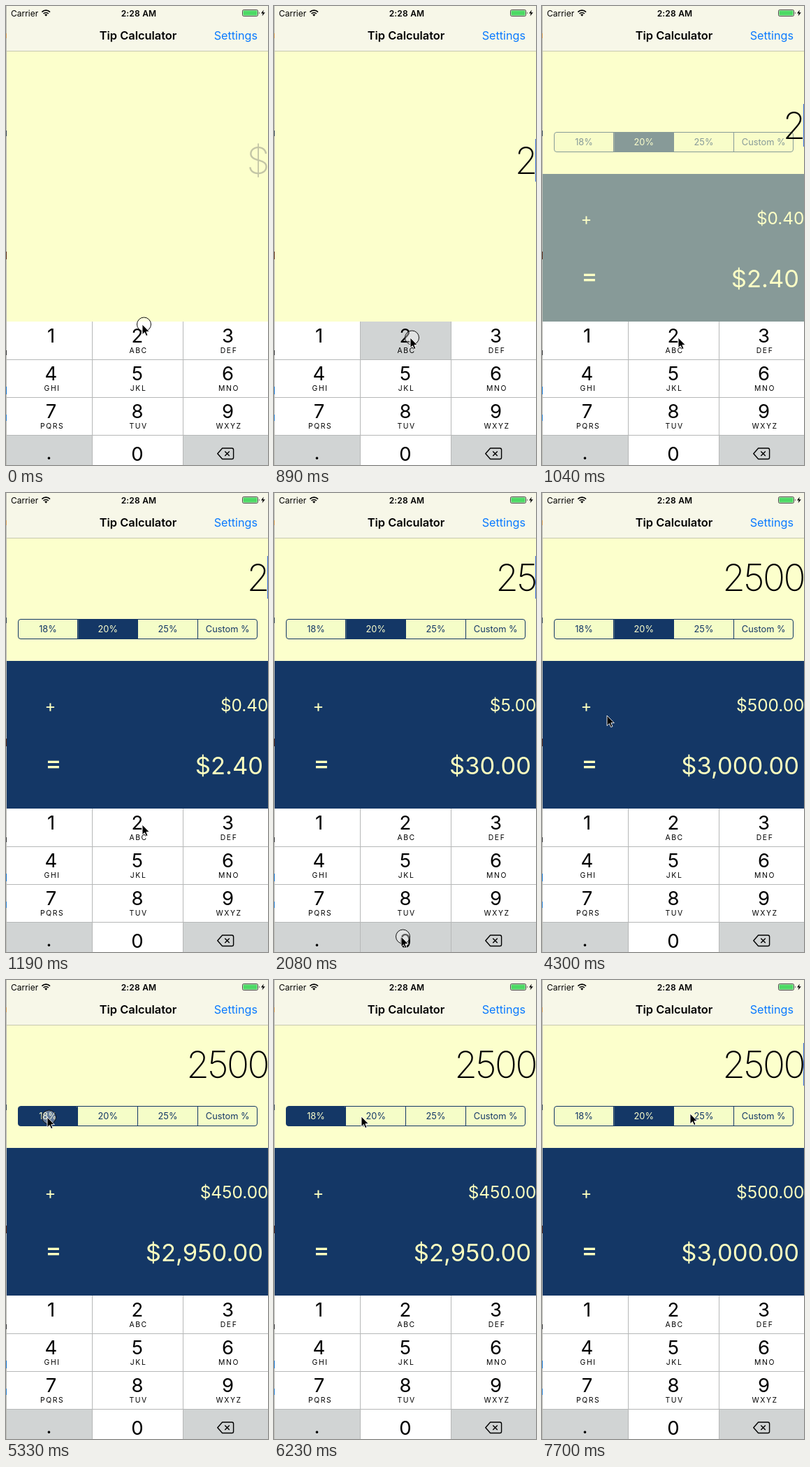
Write an HTML page that moves like this. It is 375 by 656 pixels and loops after 8 s.

```html
<!DOCTYPE html>
<html lang="en">
<head>
<meta charset="utf-8">
<title>Tip Calculator</title>
<style>
  html, body { margin: 0; width: 100%; height: 100%; overflow: hidden; background: #fff; }
  svg { display: block; width: 375px; height: 656px; font-family: Inter, Roboto, sans-serif; font-optical-sizing: none; }
  .mid { text-anchor: middle; }
  .end { text-anchor: end; }
  .key { font-size: 27.5px; }
  .sub { font-size: 10.4px; letter-spacing: 1.6px; }
  .bill { font-size: 53px; font-weight: 200; letter-spacing: -2.5px; }
  .seg { font-size: 12.8px; }
</style>
</head>
<body>
<svg id="stage" viewBox="0 0 375 656">
  <rect width="375" height="656" fill="#fcffcc"/>

  <rect width="375" height="64" fill="#f7f7e8"/>
  <rect y="64" width="375" height="1" fill="#c8c9b0"/>
  <text x="7" y="14.5" font-size="12">Carrier</text>
  <g fill="none" stroke="#000" stroke-width="1.7">
    <path d="M51.4 8.6A8.2 8.2 0 0 1 63 8.6"/>
    <path d="M53.6 11A5.1 5.1 0 0 1 60.8 11"/>
  </g>
  <path d="M55.2 12.5A2.9 2.9 0 0 1 59.2 12.5L57.2 14.7Z"/>
  <text class="mid" x="190" y="14.5" font-size="12" font-weight="600" letter-spacing=".2">2:28 AM</text>
  <rect x="338.5" y="5.5" width="22" height="9" rx="1.8" fill="none" stroke="#222" stroke-width=".8"/>
  <rect x="339.5" y="6.5" width="20" height="7" rx=".8" fill="#4cd964"/>
  <path d="M362 8.2Q363.4 10 362 11.8Z"/>
  <path d="M368.8 5.5L365 10.6H367.6L366.6 14.5L370.8 9.2H368Z"/>
  <text class="mid" x="189" y="48" font-size="16.4" font-weight="600">Tip Calculator</text>
  <text class="end" x="360" y="48" font-size="16.2" fill="#0a7aff">Settings</text>

  <g id="panel">
    <rect y="240" width="375" height="211" fill="#143766"/>
    <g fill="#fcffbf">
      <text class="mid" x="63.5" y="312.5" font-size="24">+</text>
      <text class="mid" x="68" y="398" font-size="35" font-weight="500">=</text>
      <text id="tip" class="end" x="375.5" y="312" font-size="24.4"></text>
      <text id="total" class="end" x="368" y="402" font-size="34.5"></text>
    </g>
    <g id="segs"></g>
  </g>

  <g id="field">
    <text id="bill" class="bill end" x="375" y="140"></text>
    <rect id="caret" x="374" y="90" width="1" height="61" fill="#3a6bdc"/>
  </g>

  <g id="pad"></g>

  <rect width="1" height="656" fill="#bcbcb6"/>
  <g id="edge"></g>

  <g id="pointer">
    <circle id="ring" cx="2.5" cy="0" r="10" fill="#fff" fill-opacity=".35" stroke="#111"/>
    <path d="M0 0V14.6L3.4 11.5L5.6 16.6L8 15.6L5.8 10.6H10.3Z" stroke="#fff" stroke-width=".9"/>
  </g>
</svg>

<script>
const $ = id => document.getElementById(id);
const LOOP = 8000, STEPS = 54, TICK = LOOP / STEPS;

function add(parent, tag, attrs, text) {
  const el = document.createElementNS('http://www.w3.org/2000/svg', tag);
  for (const name in attrs) el.setAttribute(name, attrs[name]);
  if (text !== undefined) el.textContent = text;
  parent.appendChild(el);
  return el;
}

// Keypad
const GREY = '#d1d4d4';
const labels = ['1', '2', '3', '4', '5', '6', '7', '8', '9', '.', '0', ''];
const letters = ['', 'ABC', 'DEF', 'GHI', 'JKL', 'MNO', 'PQRS', 'TUV', 'WXYZ'];
const cols = [0, 123, 253, 375], centers = [64.5, 188, 317.5];
const keys = {};
labels.forEach((label, i) => {
  const c = i % 3, row = Math.floor(i / 3), y = 451 + row * 54;
  const special = i === 9 || i === 11;
  const box = add($('pad'), 'rect', {
    x: cols[c], y, width: cols[c + 1] - cols[c], height: 55, fill: special ? GREY : '#fff'
  });
  if (!special) keys[label] = box;
  const dot = label === '.';
  add($('pad'), 'text', {
    class: 'key mid', x: dot ? 61.5 : centers[c], y: dot ? 648 : row === 3 ? 650 : y + 30
  }, label);
  if (letters[i]) add($('pad'), 'text', { class: 'sub mid', x: centers[c] + 1.6, y: y + 45 }, letters[i]);
});
for (const y of [505, 559, 613]) add($('pad'), 'rect', { y, width: 375, height: 1, fill: '#b6b8b8' });
for (const x of [123, 253]) add($('pad'), 'rect', { x, y: 451, width: 1, height: 205, fill: '#b6b8b8' });
add($('pad'), 'path', {
  d: 'M309.6 632H323.4Q325.6 632 325.6 634.2V645.3Q325.6 647.5 323.4 647.5H309.6L302.8 639.8ZM313.3 636.5L319.8 643M319.8 636.5L313.3 643',
  fill: 'none', stroke: '#000', 'stroke-width': 1.4, 'stroke-linejoin': 'round'
});

// Tip rate control
const NAVY = '#143766', PALE = '#f5fdc8';
add($('segs'), 'rect', { x: 17.5, y: 180.5, width: 342, height: 28, rx: 3.5, fill: PALE });
const segs = ['18%', '20%', '25%', 'Custom %'].map((label, i) => {
  const x = 17 + i * 85.75;
  const box = add($('segs'), 'rect', { x: x + .5, y: 181, width: 85.5, height: 27.5, rx: i ? 0 : 3 });
  if (i) add($('segs'), 'rect', { x: Math.round(x - .5), y: 181, width: 1, height: 27, fill: NAVY });
  const text = add($('segs'), 'text', { class: 'seg mid', x: x + 43, y: 199.3 }, label);
  return { box, text };
});
segs[3].box.setAttribute('width', 84);
segs[3].box.setAttribute('rx', 3);
add($('segs'), 'rect', { x: 17.5, y: 180.5, width: 342, height: 28, rx: 3.5, fill: 'none', stroke: NAVY });

// Slivers of the window behind
[[39, 7, '#d9a05a'], [178, 8, '#30405a'], [351, 11, '#5a2a18'], [492, 7, '#333'], [544, 11, '#1576d0'], [584, 9, '#2a86d8']]
  .forEach(([y, height, fill]) => add($('edge'), 'rect', { y, width: 1, height, fill }));

// Timeline, in ticks
const path = [
  [0, 195, 455], [2, 195, 474], [8, 195, 474], [10, 190, 523], [12, 190, 523], [14, 182, 634], [26, 182, 634],
  [29, 93, 318], [31, 93, 318], [34, 59, 196], [40, 59, 196], [42, 125, 195], [48, 125, 195], [51, 212, 191]
];
const blinks = [2, 5, 6, 17, 20, 27, 31, 35, 39, 42, 45, 48, 52];
const taps = [[0, 1], [5, 7, '2'], [11, 13, '5'], [14, 16, '0'], [22, 24, '0'], [35, 37], [45, 46]];
const typed = [6, 12, 15, 23];

const clamp = v => Math.max(0, Math.min(1, v));
const money = v => '$' + v.toLocaleString('en-US', { minimumFractionDigits: 2, maximumFractionDigits: 2 });

function position(k) {
  const next = path.findIndex(p => p[0] > k);
  if (next < 0) return path[path.length - 1].slice(1);
  const a = path[next - 1], b = path[next], u = (k - a[0]) / (b[0] - a[0]);
  return [a[1] + (b[1] - a[1]) * u, a[2] + (b[2] - a[2]) * u];
}

function draw(ms) {
  const k = Math.floor((ms % LOOP + 9) / TICK) % STEPS;
  const bill = '2500'.slice(0, typed.filter(t => t <= k).length);
  const open = clamp((k - 6) / 2);
  const chosen = k >= 36 && k < 46 ? 0 : 1;
  const tip = bill * [.18, .2][chosen];
  const tap = taps.find(([from, to]) => k >= from && k < to);

  $('bill').textContent = bill || '$';
  $('bill').setAttribute('fill', bill ? '#000' : '#c3c5a6');
  $('field').setAttribute('transform', `translate(0 ${100 * (1 - open)})`);
  $('caret').setAttribute('opacity', blinks.filter(t => t <= k).length % 2);
  $('panel').setAttribute('opacity', open);
  $('tip').textContent = money(tip);
  $('total').textContent = money(+bill + tip);

  segs.forEach(({ box, text }, i) => {
    box.setAttribute('fill', i === chosen ? NAVY : PALE);
    text.setAttribute('fill', i === chosen ? '#fcffcc' : NAVY);
  });
  for (const name in keys) keys[name].setAttribute('fill', tap && tap[2] === name ? GREY : '#fff');

  $('pointer').setAttribute('transform', `translate(${position(k)})`);
  $('ring').setAttribute('opacity', tap ? 1 : 0);
}

const start = performance.now();
function loop() {
  draw(performance.now() - start);
  requestAnimationFrame(loop);
}
loop();
</script>
</body>
</html>
```
